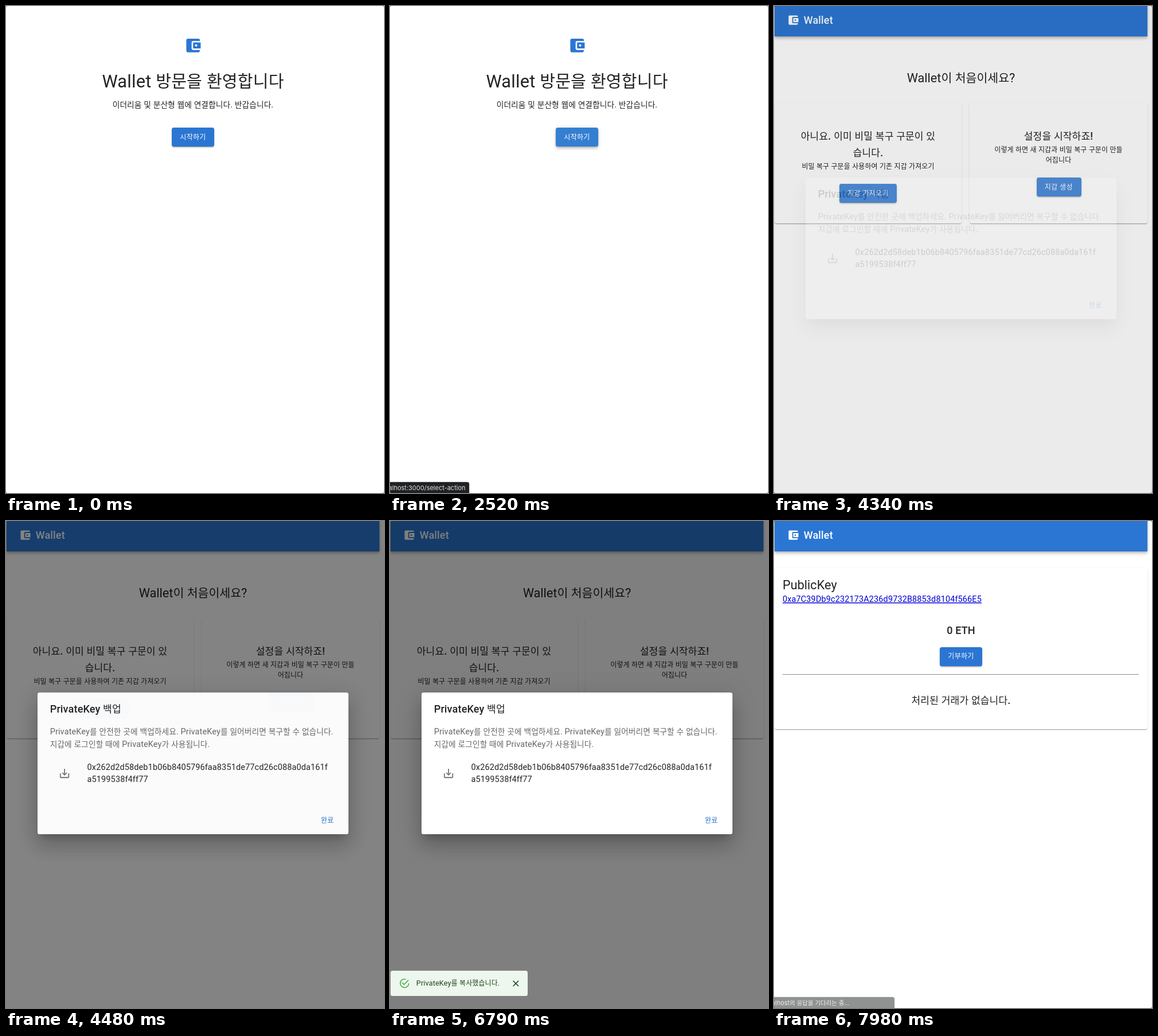
These frames come from a looping animation (659x849 px, 8000 ms). An HTML page:

```html
<!DOCTYPE html>
<html lang="ko">
<head>
<meta charset="utf-8">
<title>Wallet</title>
<style>
  :root {
    --blue: #2b76d2;
    --lift1: 0 2px 1px -1px #0003, 0 1px 1px #00000024, 0 1px 3px #0000001f;
    --lift2: 0 2.7px 1px -1.8px #0003, 0 1.8px 1.8px #00000024, 0 1px 4.5px #0000001f;
    --lift4: 0 1.8px 3.6px -1px #0003, 0 3.6px 4.5px #00000024, 0 1px 9px #0000001f;
    --lift24: 0 10px 13.5px -6.3px #0003, 0 21.7px 34px 2.7px #00000024, 0 8px 41.5px 7px #0000001f;
  }
  html, body { margin: 0; width: 100%; height: 100%; overflow: hidden; background: #fff; }
  #stage { position: relative; width: 659px; height: 849px; overflow: hidden; background: #fff; }
  #stage * { animation-duration: 8s; animation-iteration-count: infinite; animation-timing-function: step-end; }
  .layer, .box, svg { position: absolute; }
  .layer, svg { left: 0; top: 0; width: 659px; height: 849px; }
  .box { border-radius: 3.6px; }

  /* Type */
  text { font-family: Roboto, "Noto Sans CJK KR", "Noto Sans CJK", sans-serif; fill: #000000de; }
  .hangul { font-size: .946em; }
  .mid { text-anchor: middle; }
  .h4 { font-size: 30.7px; letter-spacing: .00735em; }
  .h5 { font-size: 21.7px; }
  .h6 { font-size: 18.07px; font-weight: 500; letter-spacing: .0075em; }
  .body1 { font-size: 14.46px; letter-spacing: .00938em; }
  .body2 { font-size: 12.65px; letter-spacing: .01071em; }
  .label { font-size: 12.65px; font-weight: 500; letter-spacing: .02857em; }
  .white { fill: #fff; }
  .blue { fill: var(--blue); }
  .soft { fill: #0009; }
  .alert { fill: #1e4620; }
  .link { fill: #0000d8; text-decoration: underline; }

  /* Surfaces */
  .btn { background: var(--blue); box-shadow: var(--lift2); height: 33px; }
  .card { background: #fff; box-shadow: var(--lift1); }
  #bar { left: 1px; top: -5px; width: 650px; height: 58.4px; border-radius: 0; background: var(--blue); box-shadow: var(--lift4); }
  #dialog { left: 55px; top: 299px; width: 542px; height: 246.5px; background: #fff; box-shadow: var(--lift24); }
  #done { left: 532px; top: 505px; width: 56px; height: 33px; background: #1976d20f; animation-name: done; }
  #toast { transform-origin: 120.5px 805.5px; animation-name: toast; }
  #corners { inset: 0; border-radius: 3px; box-shadow: 0 0 0 4px #888; }
  .status .box { left: -4px; top: 830px; height: 23px; background: #202223; box-shadow: 0 0 3px #0005; }
  .status text { font: 11px Inter, "Noto Sans CJK KR", "Noto Sans CJK", sans-serif; fill: #dfe1e3; text-anchor: end; }

  /* Timeline */
  #welcome { animation-name: welcome; }
  #choose { animation-name: choose; }
  #account { animation-name: account; }
  #header { animation-name: header; }
  #start { animation-name: start; }
  #create { animation-name: create; }
  .fade { animation-name: fade; }
  #linkStatus { animation-name: linkStatus; }
  #waitStatus { animation-name: waitStatus; }

  @keyframes welcome { 0% { visibility: visible } 32.375%, 100% { visibility: hidden } }
  @keyframes choose { 0% { visibility: hidden } 32.375% { visibility: visible } 96.25%, 100% { visibility: hidden } }
  @keyframes account { 0% { visibility: hidden } 96.25%, 100% { visibility: visible } }
  @keyframes header { 0% { visibility: hidden } 32.375%, 100% { visibility: visible } }
  @keyframes start {
    0% { background: var(--blue); box-shadow: var(--lift2) }
    28.875% { background: #2a71cc; box-shadow: var(--lift2) }
    29.75% { background: #2768c3; box-shadow: var(--lift4) }
    30.625% { background: #2565bf; box-shadow: var(--lift4) }
    31.5%, 100% { background: #357fd1; box-shadow: var(--lift4) }
  }
  @keyframes create {
    0% { background: var(--blue); box-shadow: var(--lift2) }
    45.5% { background: #2a71cc; box-shadow: var(--lift2) }
    46.375% { background: #2768c3; box-shadow: var(--lift4) }
    47.25% { background: #2565bf; box-shadow: var(--lift4) }
    49% { background: #357fd1; box-shadow: var(--lift4) }
    51.625%, 100% { background: var(--blue); box-shadow: var(--lift2) }
  }
  @keyframes fade {
    0% { opacity: 0 }
    54.25% { opacity: .16 }
    55.125% { opacity: .72 }
    56% { opacity: .97 }
    56.875% { opacity: 1 }
    96.25%, 100% { opacity: 0 }
  }
  @keyframes toast {
    0% { opacity: 0; transform: scale(.75, .5625) }
    65.625% { opacity: .15; transform: scale(.8, .65) }
    66.5% { opacity: .7; transform: scale(.98, .97) }
    67.375% { opacity: .97; transform: none }
    68.25% { opacity: 1; transform: none }
    91% { opacity: .9; transform: none }
    91.875% { opacity: .5; transform: scale(.95, .92) }
    92.75% { opacity: .1; transform: scale(.8, .65) }
    93.625%, 100% { opacity: 0; transform: scale(.75, .5625) }
  }
  @keyframes done { 0% { opacity: 0 } 92.75% { opacity: .4 } 93.625%, 100% { opacity: 1 } }
  @keyframes linkStatus {
    0% { opacity: 0 }
    29.75% { opacity: .4 }
    30.625% { opacity: .8 }
    31.5% { opacity: 1 }
    35.875% { opacity: .8 }
    36.75% { opacity: .55 }
    37.625% { opacity: .3 }
    38.5%, 100% { opacity: 0 }
  }
  @keyframes waitStatus {
    0% { opacity: 0 }
    94.5% { opacity: .5 }
    95.375% { opacity: 1 }
    98.875% { opacity: .75 }
    99.75%, 100% { opacity: .5 }
  }
</style>
</head>
<body>
<div id="stage">
  <svg style="display:none">
    <path id="wallet" d="M21 18v1c0 1.1-.9 2-2 2H5c-1.11 0-2-.9-2-2V5c0-1.1.89-2 2-2h14c1.1 0 2 .9 2 2v1h-9c-1.11 0-2 .9-2 2v8c0 1.1.89 2 2 2h9zm-9-2h10V8H12v8zm4-2.5c-.83 0-1.5-.67-1.5-1.5s.67-1.5 1.5-1.5 1.5.67 1.5 1.5-.67 1.5-1.5 1.5z"/>
  </svg>

  <div class="layer" id="welcome">
    <div class="box btn" id="start" style="left:289px;top:212px;width:74px"></div>
    <svg>
      <use href="#wallet" class="blue" transform="translate(310.4 53) scale(1.318)"/>
      <text class="h4 mid" x="326" y="142">Wallet 방문을 환영합니다</text>
      <text class="body1 mid" x="326" y="176.5">이더리움 및 분산형 웹에 연결합니다. 반갑습니다.</text>
      <text class="label mid white" x="326" y="233">시작하기</text>
    </svg>
  </div>

  <div class="layer" id="choose">
    <div class="box card" style="left:1px;top:169px;width:326px;height:210px"></div>
    <div class="box card" style="left:341px;top:169px;width:310px;height:210px"></div>
    <div class="box btn" style="left:114px;top:310px;width:100px"></div>
    <div class="box btn" id="create" style="left:457.5px;top:299px;width:78px"></div>
    <svg>
      <text class="h5 mid" x="326" y="132.8">Wallet이 처음이세요?</text>
      <text class="h6 mid" x="164" y="233.2">아니요. 이미 비밀 복구 구문이 있</text>
      <text class="h6 mid" x="164" y="262">습니다.</text>
      <text class="body2 mid" x="164" y="283.5">비밀 복구 구문을 사용하여 기존 지갑 가져오기</text>
      <text class="label mid white" x="164" y="330.7">지갑 가져오기</text>
      <text class="h6 mid" x="496" y="233.2">설정을 시작하죠!</text>
      <text class="body2 mid" x="496" y="254.7">이렇게 하면 새 지갑과 비밀 복구 구문이 만들</text>
      <text class="body2 mid" x="496" y="272.8">어집니다</text>
      <text class="label mid white" x="496.3" y="319.8">지갑 생성</text>
    </svg>
  </div>

  <div class="layer" id="account">
    <div class="box card" style="left:1px;top:82px;width:650px;height:281px"></div>
    <div class="box btn" style="left:289px;top:219.7px;width:74px"></div>
    <div class="box" style="left:15px;top:267px;width:621px;height:1px;border-radius:0;background:#8c8c8c"></div>
    <svg>
      <text class="h5" x="15" y="118.6">PublicKey</text>
      <text class="body1 link" x="15" y="141">0xa7C39Db9c232173A236d9732B8853d8104f566E5</text>
      <text class="h6 mid" x="326" y="197">0 ETH</text>
      <text class="label mid white" x="326" y="240.3">기부하기</text>
      <text class="h6 mid" x="326" y="318.6">처리된 거래가 없습니다.</text>
    </svg>
  </div>

  <div class="layer" id="header">
    <div class="box" id="bar"></div>
    <svg>
      <use href="#wallet" class="white" transform="translate(22.7 13.7) scale(.9035)"/>
      <text class="h6 white" x="51.7" y="31">Wallet</text>
    </svg>
  </div>

  <div class="layer fade" style="background:#00000080"></div>
  <div class="layer fade">
    <div class="box" id="dialog"></div>
    <div class="box" id="done"></div>
    <svg>
      <text class="h6" x="76.7" y="334.2">PrivateKey 백업</text>
      <text class="body1 soft" x="76.7" y="372">PrivateKey를 안전한 곳에 백업하세요. PrivateKey를 잃어버리면 복구할 수 없습니다.</text>
      <text class="body1 soft" x="76.7" y="393.7">지갑에 로그인할 때에 PrivateKey가 사용됩니다.</text>
      <path fill="#0000008a" transform="translate(91.2 429.2) scale(.9035)" d="M19 12v7H5v-7H3v7c0 1.1.9 2 2 2h14c1.1 0 2-.9 2-2v-7h-2zm-6 .67l2.59-2.58L17 11.5l-5 5-5-5 1.41-1.41L11 12.67V3h2z"/>
      <text class="body1" x="141.6" y="433.7">0x262d2d58deb1b06b8405796faa8351de77cd26c088a0da161f</text>
      <text class="body1" x="141.6" y="455.4">a5199538f4ff77</text>
      <text class="label mid blue" x="560.3" y="525.6">완료</text>
    </svg>
  </div>

  <div class="layer" id="toast">
    <div class="box" style="left:1px;top:784px;width:239px;height:43.5px;background:#edf7ed"></div>
    <svg>
      <path fill="#4caf50" transform="translate(15.4 796) scale(.828)" d="M20 12A8 8 0 1 1 12 4C12.76 4 13.5 4.11 14.2 4.31L15.77 2.74C14.61 2.26 13.34 2 12 2A10 10 0 1 0 22 12M7.91 10.08L6.5 11.5 11 16 21 6 19.59 4.58 11 13.17z"/>
      <text class="body2 alert" x="45.8" y="810.2">PrivateKey를 복사했습니다.</text>
      <path class="alert" transform="translate(210.3 797.3) scale(.753)" d="M19 6.41L17.59 5 12 10.59 6.41 5 5 6.41 10.59 12 5 17.59 6.41 19 12 13.41 17.59 19 19 17.59 13.41 12z"/>
    </svg>
  </div>

  <div class="layer status" id="linkStatus">
    <div class="box" style="width:142px"></div>
    <svg><text x="131.5" y="843.6">localhost:3000/select-action</text></svg>
  </div>
  <div class="layer status" id="waitStatus">
    <div class="box" style="width:213.5px"></div>
    <svg><text x="132" y="843.6">localhost의 응답을 기다리는 중...</text></svg>
  </div>

  <div class="box" id="corners"></div>
</div>
<script>
  // Hangul is set slightly smaller than the Latin letters beside it.
  for (const line of document.querySelectorAll("text"))
    line.innerHTML = line.innerHTML.replace(/[가-힣]+/g, '<tspan class="hangul">$&</tspan>');
</script>
</body>
</html>
```
